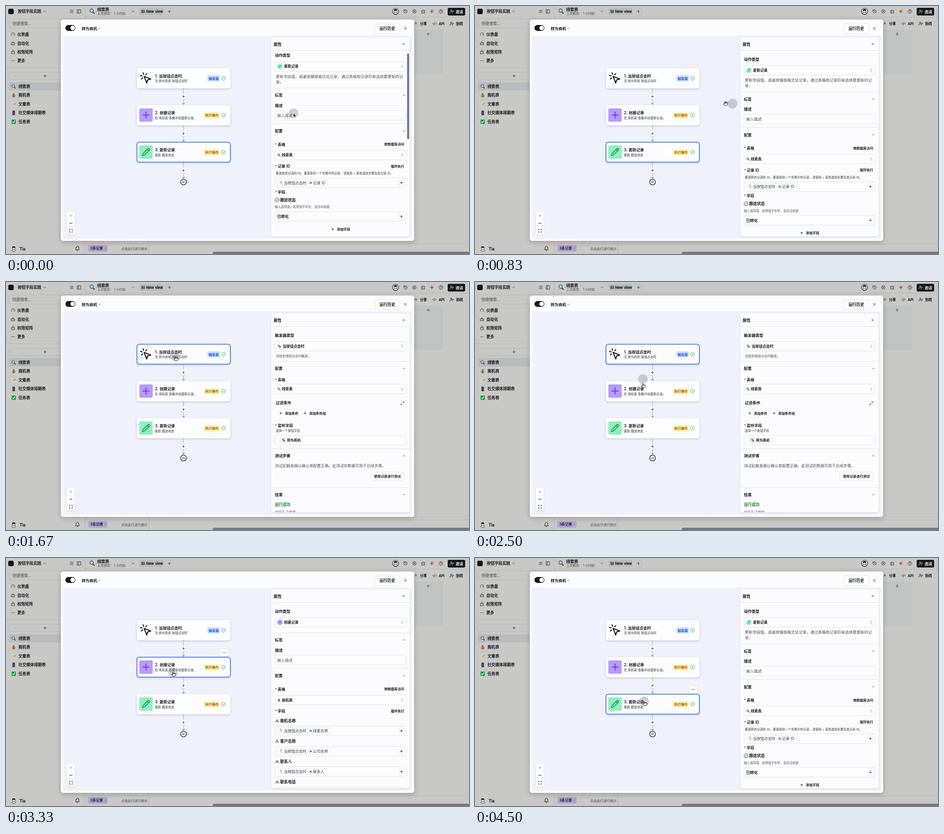
These frames come from a looping animation (1021x548 px, 5.01 s). An HTML page with a canvas:

```html
<!DOCTYPE html>
<html lang="zh-CN">
<head>
<meta charset="utf-8">
<title>按钮字段自动化</title>
<style>
html, body { margin: 0; width: 100%; height: 100%; overflow: hidden; background: #c8c9c6; }
canvas { display: block; }
</style>
</head>
<body>
<canvas id="stage" width="1021" height="548"></canvas>
<script>
const ctx = document.getElementById('stage').getContext('2d');
const LOOP = 5010, FPS = 12;
const INK = '#17181c', MUTED = '#4c505a', LINE = '#e2e4ea', BLUE = '#2b68ee', GREEN = '#2ba34d', DIM = '#b6b7b6';

// Icons live on a 24 × 24 grid.
const ICON = {
  plus: 'M5 12h14M12 5v14',
  minus: 'M5 12h14',
  cross: 'M18 6 6 18M6 6l12 12',
  down: 'm6 9 6 6 6-6',
  up: 'm18 15-6-6-6 6',
  left: 'm15 18-6-6 6-6',
  updown: 'm7 15 5 5 5-5M7 9l5-5 5 5',
  check: 'M22 12a10 10 0 1 1-20 0a10 10 0 1 1 20 0M8 12l3 3 5-6',
  click: 'M14 4.1 12 6M5.1 8l-2.9-.8M6 12l-1.9 2M7.2 2.2 8 5.1M9 9l12.5 5-5.8 1.7-1.7 5.8z',
  pencil: 'M21.2 6.8a2.8 2.8 0 0 0-4-4L3.8 16.2a2 2 0 0 0-.5.8L2 22l5-1.3a2 2 0 0 0 .8-.5zM15 5l4 4',
  letter: 'M3 20 12 4l9 16M6.5 14h11',
  menu: 'M3 5h18M3 12h18M3 19h18',
  sidebar: 'M3 3h18v18H3zM9 3v18',
  grid: 'M3 4h18v16H3zM3 10h18M3 15h18M10 4v16',
  gauge: 'M12 14l4-4M4 19a10 10 0 1 1 16 0',
  bot: 'M3 9h18v11H3zM12 9V4H8M8 14v2M16 14v2',
  lock: 'M4 11h16v11H4zM7 11V7a5 5 0 0 1 10 0v4',
  bell: 'M6 8a6 6 0 0 1 12 0c0 7 3 9 3 9H3s3-2 3-9M10 21h4',
  history: 'M3 12a9 9 0 1 0 3-7L3 8M3 3v5h5M12 7v5l4 2',
  gear: 'M12 2l3 3 4 0 1 4 2 3-2 3-1 4-4 0-3 3-3-3-4 0-1-4-2-3 2-3 1-4 4 0zM15 12a3 3 0 1 1-6 0a3 3 0 1 1 6 0',
  puzzle: 'M4 7h5a3 3 0 1 1 6 0h5v5a3 3 0 1 0 0 5v4H4v-5a3 3 0 1 0 0-5z',
  spark: 'M12 2l2.5 7.5L22 12l-7.5 2.5L12 22l-2.5-7.5L2 12l7.5-2.5zM20 2v5',
  help: 'M22 12a10 10 0 1 1-20 0a10 10 0 1 1 20 0M9 9a3 3 0 1 1 4 3l-1 2M12 17v.5',
  person: 'M13 7a4 4 0 1 1-8 0a4 4 0 1 1 8 0M2 21v-2a5 5 0 0 1 5-5h4a5 5 0 0 1 5 5v2M19 8v6M16 11h6',
  arrow: 'M7 17 17 7M8 7h9v9',
  code: 'm18 16 4-4-4-4M6 8l-4 4 4 4M14 4l-4 16',
  expand: 'M15 3h6v6M9 21H3v-6M21 3l-7 7M3 21l7-7',
  corners: 'M8 3H3v5M21 8V3h-5M3 16v5h5M16 21h5v-5',
  pointer: 'M18 11v-1a2 2 0 0 0-4 0M14 10V9a2 2 0 0 0-4 0v1M10 9.5V4a2 2 0 0 0-4 0v10M18 11a2 2 0 1 1 4 0v3a8 8 0 0 1-8 8h-2c-2.8 0-4.5-.9-6-2.3l-3.6-3.6a2 2 0 0 1 2.8-2.8L7 15',
  grab: 'M18 11V6a2 2 0 0 0-4 0v5M14 10V4a2 2 0 0 0-4 0v6M10 10.5V6a2 2 0 0 0-4 0v8M18 8a2 2 0 1 1 4 0v6a8 8 0 0 1-8 8h-2c-2.8 0-4.5-.9-6-2.3l-3.6-3.6a2 2 0 0 1 2.8-2.8L7 15',
  arrowCursor: 'M5 2v18l4.500-4.500L13 22l3-1.500L13 14h6z',
  beam: 'M8 2c3 0 4 1 4 3v14c0 2-1 3-4 3M16 2c-3 0-4 1-4 3M12 19c0 2 1 3 4 3M10 13h4'
};

function icon(name, x, y, size = 10, color = INK, weight = 2, fill) {
  const path = new Path2D(ICON[name]);
  ctx.save();
  ctx.translate(x - size / 2, y - size / 2);
  ctx.scale(size / 24, size / 24);
  ctx.lineCap = ctx.lineJoin = 'round';
  if (fill) { ctx.fillStyle = fill; ctx.fill(path); }
  ctx.strokeStyle = color;
  ctx.lineWidth = weight;
  ctx.stroke(path);
  ctx.restore();
}

function text(str, x, y, size = 8.5, weight = 400, color = INK, align = 'left') {
  ctx.font = `${weight} ${size}px Inter, "Noto Sans CJK SC", "Noto Sans CJK", sans-serif`;
  ctx.textAlign = align;
  ctx.fillStyle = color;
  ctx.fillText(str, x, y + size * 0.37);
  // CJK glyphs have no medium cut, so a hairline outline thickens them.
  if (weight === 500) {
    ctx.strokeStyle = color;
    ctx.lineWidth = .28;
    ctx.strokeText(str, x, y + size * 0.37);
  }
}
const bold = (str, x, y, size = 8.5, color = INK, align) => text(str, x, y, size, 600, color, align);

// Rectangle given by its left, top, right and bottom edges.
function box(l, t, r, b, radius, fill, stroke, width = 1) {
  ctx.beginPath();
  ctx.roundRect(l, t, r - l, b - t, radius);
  if (fill) { ctx.fillStyle = fill; ctx.fill(); }
  if (stroke) { ctx.strokeStyle = stroke; ctx.lineWidth = width; ctx.stroke(); }
}
function disc(x, y, r, fill, stroke, width = 1) {
  box(x - r, y - r, x + r, y + r, r, fill, stroke, width);
}
function line(x1, y1, x2, y2, color = LINE, width = 1) {
  ctx.beginPath();
  ctx.moveTo(x1, y1);
  ctx.lineTo(x2, y2);
  ctx.strokeStyle = color;
  ctx.lineWidth = width;
  ctx.stroke();
}
function dots(x, y) {
  for (const d of [-3, 0, 3]) disc(x + d, y, .8, INK);
}
function shadow(blur, dy, color) {
  ctx.shadowBlur = blur;
  ctx.shadowOffsetY = dy;
  ctx.shadowColor = color;
}
const noShadow = () => shadow(0, 0, 'transparent');

const emoji = {
  search(x, y, s = 1) {
    line(x + 1.5 * s, y + 1.5 * s, x + 4.2 * s, y + 4.2 * s, '#33363c', 1.8 * s);
    disc(x - s, y - s, 3 * s, '#b3d3e6', '#4b525b', 1.1 * s);
  },
  money(x, y, s = 1) {
    disc(x, y + 1.2 * s, 3.6 * s, '#b98a3c');
    box(x - 1.6 * s, y - 4.5 * s, x + 1.6 * s, y - s, 1, '#8d6427');
    bold('$', x, y + 1.5 * s, 5 * s, '#5c3d10', 'center');
  },
  memo(x, y) {
    box(x - 4, y - 4, x + 3, y + 5, 1, '#dedbd0');
    for (const d of [-2, 0, 2]) line(x - 2.5, y + d, x + 1.5, y + d, '#85858a', .6);
    line(x, y + 2, x + 4.5, y - 2.5, '#c98a1c', 1.8);
  },
  phone(x, y) {
    box(x - 2.7, y - 5, x + 2.7, y + 5, 1, '#2b2c34');
    box(x - 1.8, y - 3.8, x + 1.8, y + 3.6, 0, '#474b60');
  },
  done(x, y) {
    box(x - 4.7, y - 4.7, x + 4.7, y + 4.7, 1.5, '#159a3c');
    line(x - 2.8, y, x - .7, y + 2.4, '#fff', 1.4);
    line(x - .7, y + 2.4, x + 2.8, y - 2.6, '#fff', 1.4);
  }
};

function avatar(x, y, r) {
  disc(x, y, r, '#cfcfd1', r > 6.5 ? INK : null);
  box(x - 4, y + 2, x + 4, y + 6, 2.5, '#eeeeef', INK, .8);
  disc(x, y - .5, 3.2, '#ececec', INK, .7);
  box(x - 3.6, y - 5, x + 3.6, y - 1.5, [3, 3, 0, 0], INK);
}

function backdrop() {
  ctx.fillStyle = '#c8c9c6';
  ctx.fillRect(0, 0, 1021, 548);
  ctx.fillStyle = '#c1c2c2';
  ctx.fillRect(174, 52, 788, 98);
  line(174.5, 0, 174.5, 548, DIM);
  line(174, 24.5, 1021, 24.5, DIM);
  line(174, 525.5, 1021, 525.5, DIM);
  line(962.5, 52, 962.5, 150, '#bcbdbe');

  box(5, 6, 17, 18, 3, '#111216');
  text('按钮字段实践', 26, 12, 8.6, 500);
  icon('down', 85, 12, 9);
  icon('menu', 145, 12, 9);
  icon('sidebar', 161, 12, 10);
  emoji.search(190, 11.5, 1.25);
  text('线索表', 201, 8, 8.8, 500);
  text('上次修改： 1 小时前', 201, 16, 7, 400, '#45464b');
  icon('down', 280, 12, 9);
  box(294, 4, 347, 20, 3, '#bbbcbd');
  icon('grid', 302.5, 12, 8.5);
  text('New view', 309, 12, 8, 500);
  box(352.5, 4.5, 368.5, 20.5, 3, null, DIM);
  icon('plus', 360.5, 12, 9.5);

  avatar(859, 12, 7);
  ['history', 'gear', 'puzzle'].forEach((name, i) => icon(name, 881 + i * 19.5, 12, 10));
  icon('spark', 939, 12, 10, '#d0452c', 1.5, '#d0452c');
  icon('help', 959, 12, 10);
  box(974, 4, 1012.5, 21, 3, '#15171b');
  icon('person', 983, 12, 9.5, '#d8d8da');
  bold('邀请', 991.5, 12.5, 8.4, '#e2e2e4');
  icon('arrow', 903, 39, 9);
  text('分享', 913, 39, 7.6, 500);
  icon('code', 945, 39, 10);
  text('API', 954.5, 39, 7.6, 500);
  icon('person', 983, 39, 10);
  text('协同', 992.5, 39, 7.6, 500);
  icon('plus', 931, 62, 11, '#45464b');

  box(6.5, 28.5, 168, 48.5, 3, null, DIM);
  text('快捷搜索...', 14, 38.5, 8.6, 400, '#45464b');
  [['gauge', '仪表盘', 62.5], ['bot', '自动化', 82.5], ['lock', '权限矩阵', 101.5], [null, '更多', 121]].forEach(([name, label, y]) => {
    if (name) icon(name, 15.5, y, 9.5);
    else dots(15.5, y);
    text(label, 25, y, 8.6, 500);
  });
  line(0, 136.5, 174, 136.5, DIM);
  box(6.5, 146.5, 168, 162.5, 3, null, DIM);
  icon('plus', 86, 154.5, 9.5);
  box(6, 168.5, 172, 186.5, 3, '#babbbc');
  [['search', '线索表'], ['money', '商机表'], ['memo', '文章表'], ['phone', '社交媒体排期表'], ['done', '任务表']].forEach(([mark, label], i) => {
    const y = 177.8 + i * 19.5;
    emoji[mark](17, y);
    text(label, 27.5, y, 8.6, 500);
  });
  avatar(17, 536, 6.4);
  text('Tia', 30, 536.5, 8.8, 500);
  icon('bell', 157.5, 536, 12);

  box(181, 528, 224, 543, 3, '#b3a8cf');
  text('3条记录', 186, 535.5, 7.7, 500, '#2c2540');
  icon('left', 219, 535.5, 8, '#2c2540');
  text('点击此行进行统计', 254, 536, 7.3, 400, '#3d3e43');
  line(315.5, 519, 315.5, 548, '#aeafb0');
  box(456, 543, 1025, 549, 3, '#77777c');
}

function modal() {
  shadow(12, 3, 'rgba(0,0,0,.22)');
  box(121, 30, 900, 519, 5, '#fcfcfe');
  noShadow();
  box(131, 42, 153, 55, 6.5, '#17181c');
  disc(147, 48.5, 5, '#fff');
  bold('转为商机', 167, 49.5, 8.5);
  icon('down', 206, 49.5, 8);
  box(813.5, 39.5, 868.5, 60.5, 3, '#fff', LINE);
  bold('运行历史', 840.8, 50, 8.7, INK, 'center');
  icon('cross', 880.5, 49.5, 10);

  box(126, 65, 895, 514, 3, '#eff2fb');
  ctx.fillStyle = '#dce0ea';
  for (let x = 130; x < 894; x += 16.3)
    for (let y = 71; y < 513; y += 16.3) ctx.fillRect(x, y, 1, 1);

  shadow(3, 1, 'rgba(0,0,0,.12)');
  box(134.5, 455, 151.5, 504.5, 2, '#fff');
  noShadow();
  icon('plus', 143, 463.5, 11, '#9a9ba1', 1.8);
  icon('minus', 143, 480, 11, INK, 2.6);
  icon('corners', 143, 496.5, 9, INK, 2.6);
  line(135, 471.5, 151, 471.5, '#eeeef1');
  line(135, 488, 151, 488, '#eeeef1');
}

const NODES = [
  { y: 137, title: '1. 当按钮点击时', note: '当 转为商机 按钮点击时', trigger: true },
  { y: 218.7, title: '2. 创建记录', note: '在 商机表 表格中创建新记录。', mark: 'plus', fill: '#b69cfb', color: '#7a35ea' },
  { y: 300.4, title: '3. 更新记录', note: '更新 跟进状态', mark: 'pencil', fill: '#92efc0', color: '#159a55' }
];

function flow(selected, hovered) {
  NODES.forEach((node, i) => {
    const { y } = node, active = i === selected || i === hovered;
    line(391.5, y + 45, 391.5, y + 80, '#a9abb4');
    ctx.fillStyle = '#a0a2ab';
    ctx.beginPath();
    ctx.moveTo(388, y + 77.5);
    ctx.lineTo(395, y + 77.5);
    ctx.lineTo(391.5, y + 81.5);
    ctx.fill();
    shadow(2, .5, 'rgba(0,0,0,.2)');
    disc(391.5, y + 63, 6.6, '#fff');
    noShadow();
    icon('plus', 391.5, y + 63, 9.5, INK, 2.2);

    shadow(4, 1.5, 'rgba(20,25,50,.2)');
    box(288.5, y + .3, 495, y + 45, 5, '#fdfdff');
    noShadow();
    if (active) box(288.8, y + .6, 494.7, y + 44.6, 5, null, BLUE, 1.5);
    if (node.trigger) icon('click', 308, y + 22, 28, INK, 1.9);
    else {
      box(294, y + 7.5, 323.5, y + 37, 3, node.fill);
      icon(node.mark, 308.7, y + 22.3, node.mark === 'plus' ? 23 : 19, node.color, 2.3);
    }
    bold(node.title, 328.5, y + 17.5, 8.5);
    text(node.note, 328.3, y + 28.6, 6.8, 400, '#2b2d33');
    box(node.trigger ? 444 : 436, y + 16, 472, y + 30, 3, node.trigger ? '#cfe0fe' : '#fdf3b0');
    bold(node.trigger ? '触发器' : '执行操作', node.trigger ? 458 : 454, y + 23, 7.4, node.trigger ? '#1d55dc' : '#9a5a12', 'center');
    icon('check', 479.5, y + 22.6, 10.5, GREEN, 2);
    if (i === hovered && !node.trigger) {
      box(471.5, y - 18, 491.5, y - 2, 3, '#fff', LINE);
      dots(481.3, y - 10);
    }
  });
  disc(391.5, 389, 6.3, '#f3f5fc', INK, 1.3);
  line(388.5, 389, 394.5, 389, INK, 1.3);
}

// Building blocks of the property panel.
const rule = y => line(585, y + .5, 890, y + .5);
function section(label, y) {
  bold(label, 593, y);
  icon('up', 878, y, 8.5);
}
function required(label, y, action) {
  bold('*', 593, y + 1, 8.5, '#dc2626');
  bold(label, 599, y);
  if (action) bold(action, 878, y, 7.3, INK, 'right');
}
const field = y => box(593.5, y - 10.5, 882.5, y + 10.5, 3, '#fdfdff', LINE);
function select(label, x, y) {
  field(y);
  bold(label, x, y, 8);
  icon('updown', 873.5, y, 8, '#55585f');
}
function tableSelect(label, mark, y) {
  select(label, 608, y);
  emoji[mark](602, y, .75);
}
function actionSelect(label, node, y) {
  bold('动作类型', 593, y - 24.5);
  select(label, 613, y);
  disc(604, y, 6, node.fill);
  icon(node.mark, 604, y, 7.5, node.color, 2);
}
function labelInput(y) {
  section('标签', y);
  text('描述', 593, y + 22.5, 8.5, 500);
  field(y + 44.5);
  text('输入描述', 598, y + 44.5, 8.5, 400, MUTED);
}
function insertButton(y) {
  box(866.5, y - 6, 877.5, y + 6, 2, '#fff', LINE);
  icon('plus', 872, y, 9, INK, 2.4);
}
function reference(label, right, y) {
  field(y);
  box(599.5, y - 6.5, right, y + 6.5, 3, '#fff', LINE);
  text('1. 当按钮点击时', 604.5, y, 8.3, 400, '#33363d');
  line(665.5, y - 5, 665.5, y + 5);
  icon('letter', 672, y, 7.5, INK, 2.6);
  text(label, 677, y, 8.3, 400, '#33363d');
  insertButton(y);
}
function addLabel(label, x, y) {
  icon('plus', x, y, 8.5, INK, 2.4);
  bold(label, x + 9, y, 7.4);
}

function updatePanel() {
  actionSelect('更新记录', NODES[2], 142);
  text('更新字段值，或者按模版格式化记录，通过表格和记录ID来选择要更新的记', 595, 164, 8.5, 400, MUTED);
  text('录。', 595, 176, 8.5, 400, MUTED);
  rule(189.5);
  labelInput(205.5);
  rule(268);
  section('配置', 284.5);
  required('表格', 314, '跨数据库访问');
  tableSelect('线索表', 'search', 338);
  required('记录 ID', 362.5, '循环执行');
  text('要更新的记录的 ID。要更新前一个步骤中的记录，请使用 + 菜单选择步骤及其记录 ID。', 595, 378.5, 6.7, 400, '#33363d');
  reference('记录 ID', 709.5, 399);
  required('字段', 419);
  icon('check', 597.8, 437, 10.5);
  text('跟进状态', 604.5, 437, 8.6, 500);
  text('输入选项值，如项值不存在，会自动创建', 593, 452.5, 6.7, 400, MUTED);
  field(473.5);
  text('已转化', 598, 473.5, 8.5, 500);
  insertButton(473.5);
  addLabel('添加字段', 720.5, 501.5);
}

function triggerPanel() {
  bold('触发器类型', 593, 117.5);
  select('当按钮点击时', 610, 142);
  icon('click', 603, 142, 9.5);
  text('当指定按钮点击时触发。', 595, 163, 7.1, 400, MUTED);
  rule(175);
  section('配置', 191);
  required('表格', 216);
  tableSelect('线索表', 'search', 236.5);
  bold('过滤条件', 595, 267);
  icon('expand', 874, 268, 8.5);
  addLabel('添加条件', 606, 290);
  addLabel('添加条件组', 659.5, 290);
  required('监听字段', 317);
  text('选择一个按钮字段', 595, 328.8, 6.7, 400, '#33363d');
  field(349.5);
  box(603, 343, 654, 356.5, 3, '#f1f2f6');
  icon('click', 612.5, 349.5, 9);
  bold('转为商机', 620, 349.5, 7.4);
  rule(368);
  section('测试步骤', 384);
  text('测试此触发器以确认其配置正确。此测试的数据可用于后续步骤。', 593, 406.3, 8.45, 400, MUTED);
  box(804.5, 420, 878, 439, 3, '#fff', LINE);
  bold('使用记录进行测试', 841, 429.5, 7.4, INK, 'center');
  rule(454);
  section('结果', 470);
  text('运行成功', 593, 492, 8.6, 500, '#247a3e');
  text('运行于 几秒前', 593, 508, 7.3, 400, '#33363d');
}

function createPanel() {
  actionSelect('创建记录', NODES[1], 142);
  rule(165);
  labelInput(181);
  rule(243);
  section('配置', 260);
  required('表格', 289.5, '跨数据库访问');
  tableSelect('商机表', 'money', 313.8);
  required('字段', 338, '循环执行');
  [['商机名称', '线索名称', 716], ['客户名称', '公司名称', 716], ['联系人', '联系人', 707.5], ['联系电话', '公司电话', 716]].forEach(([label, source, right], i) => {
    const y = 360 + i * 45;
    icon('letter', 598, y, 9.5, INK, 2.2);
    text(label, 604.5, y, 8.6, 500);
    reference(source, right, y + 22);
  });
}

const PANELS = [triggerPanel, createPanel, updatePanel];

function panel(selected, tick) {
  const scroll = tick < 4 ? 8.5 : 0;
  shadow(3, 1, 'rgba(20,25,50,.12)');
  box(585, 70, 890, 509, 5, '#fcfcfe');
  noShadow();
  bold('属性', 590, 84.3, 8.7);
  icon('cross', 877, 84.3, 7.5, INK, 2.5);
  rule(98);
  ctx.save();
  ctx.beginPath();
  ctx.rect(585, 99.5, 305, 409);
  ctx.clip();
  ctx.translate(0, -scroll);
  PANELS[selected]();
  ctx.restore();
  if (tick < 10) box(884.5, 100.5 + scroll / 2, 889, 290 + scroll / 2, 2.2, '#77787c');
}

// Pointer travels: first tick, start and end point; each lasts seven ticks.
const MOVES = [
  { tick: 8, from: [634, 237], to: [375, 169] },
  { tick: 27, from: [375, 169], to: [370, 256.5] },
  { tick: 45, from: [370, 256.5], to: [375, 321.5] }
];
const ease = p => p < .5 ? 4 * p ** 3 : 1 - 4 * (1 - p) ** 3;

function along(tick, trailing) {
  const move = MOVES.findLast(m => tick >= m.tick) || MOVES[0];
  const at = t => ease(Math.min(1, Math.max(0, (t - move.tick + 1) / 7)));
  let p = at(tick);
  if (trailing && p < 1) p = .7 * p + .3 * at(tick - 1);
  return move.from.map((v, i) => v + (move.to[i] - v) * p);
}

function nodeAt([x, y]) {
  return NODES.findIndex(n => x > 288 && x < 495 && y - 4 > n.y && y - 4 < n.y + 45);
}

function pointer(tick) {
  const spot = along(tick), [x, y] = spot, [dx, dy] = along(tick, true);
  const offset = tick < 8 ? [0, 0] : [-2, -4.5];
  const pressed = tick >= 14 && tick < 20;
  disc(dx + offset[0], dy + offset[1], pressed ? 8.5 : 10.8, 'rgba(125,125,135,.34)');
  if (tick >= 2 && tick < 8) icon('beam', x, y, 12, '#000', 2);
  else if (x > 585) icon('arrowCursor', x + 3, y + 5, 11, '#fff', 1.5, '#000');
  else icon(nodeAt(spot) < 0 ? 'grab' : 'pointer', x, y, 11, '#111', 2, '#fff');
}

function draw(tick) {
  const selected = tick < 20 ? 2 : tick < 40 ? 0 : tick < 54 ? 1 : 2;
  const under = nodeAt(along(tick));
  const hovered = under === nodeAt(along(tick - 1)) ? under : -1;
  backdrop();
  modal();
  flow(selected, hovered);
  panel(selected, tick);
  pointer(tick);
}

let shown = -1;
function frame() {
  const tick = Math.floor((performance.now() % LOOP + 4) * FPS / 1000);
  if (tick !== shown) draw(shown = tick);
  requestAnimationFrame(frame);
}
frame();
</script>
</body>
</html>
```
